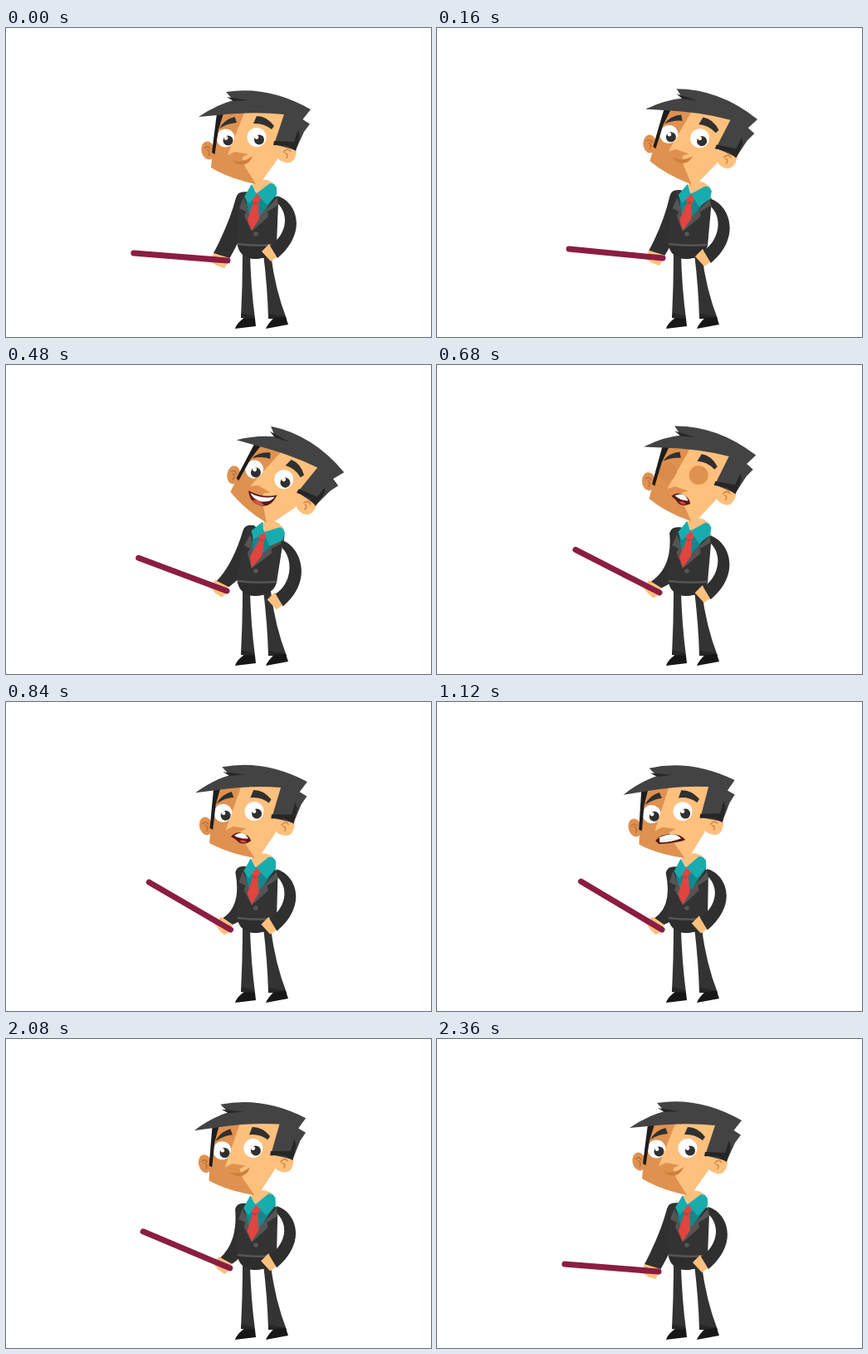
Write an HTML page that moves like this. It is 512 px wide and 372 px high and loops after 2880 ms.

```html
<!DOCTYPE html>
<html lang="en">
<head>
<meta charset="utf-8">
<title>Presenter</title>
<style>
  html, body { margin: 0; width: 100%; height: 100%; overflow: hidden; background: #fff; }
  svg { display: block; width: 100%; height: 100%; }
</style>
</head>
<body>
<svg viewBox="0 0 512 372">
  <g id="legs">
    <path fill="#333" d="M285 272H294Q295 312 300 350L283 349Q285 310 285 272Z"/>
    <path fill="#333" d="M310 272H319Q324 314 338 350L316 350Q315 312 310 272Z"/>
    <path fill="#262626" d="M284 343L299 347 300 351 283 349ZM317 344L336 347 338 351 316 350Z"/>
    <path fill="#171717" d="M276 362Q278 355 287 349L300 350 301 359ZM313 362Q316 355 323 349L337 348 340 357Z"/>
  </g>

  <path id="hand" fill="#fec07d"/>
  <path id="sleeve" fill="#303030"/>
  <path id="jacket" fill="#333"/>
  <path fill="#2d2d2d" d="M279 260Q300 263 325 261Q322 277 300 278Q281 277 279 260Z"/>
  <path fill="none" stroke="#565656" stroke-width="2.5" d="M279 260Q300 263 325 261"/>
  <g id="front">
    <path fill="#12888c" d="M288 202L326 200 315 215 296 244Z"/>
    <path fill="#555" d="M286 204L281 217 289 221 287 226 296 245 297 236 290 214Z"/>
    <path fill="#555" d="M327 204L328 213 315 221 316 227 296 245 306 226Z"/>
    <path fill="#e2443f" d="M302 198L309 204 304 210 305 230 296 244 291 231 298 210 295 205Z"/>
    <path fill="#c93a37" d="M298 209L304 210 300 213Z"/>
  </g>
  <circle cx="301" cy="248" r="2.8" fill="#565656"/>
  <path id="hip" fill="#fec07d" d="M308 269L317 260 329 274 319 281Z"/>
  <path id="arm" fill="#2f2f2f"/>

  <g id="top">
    <path fill="#fec07d" d="M299 182L315 183 323 187 303 200 297 190Z"/>
    <path fill="#18acae" d="M296 188L302 200 293 212 287 203Z"/>
    <path fill="#18acae" d="M318 187L323 188 326 192 326 201 314 213 302 199Z"/>

    <ellipse cx="243.5" cy="147.5" rx="8" ry="11" fill="#df9150" transform="rotate(-12 243.5 147.5)"/>
    <path fill="none" stroke="#b96f35" stroke-width="1.4" d="M239 145Q244 140 246 146M242 146Q247 149 244 154"/>
    <path fill="#df9150" d="M257 102H290L288 160 301 188Q268 181 247 168L250 138Z"/>
    <path fill="#fec07d" d="M287 102L338 100 326 140 327 158 307 186 301 188 288 167 284 154 267 153Z"/>
    <path fill="#df9150" d="M267 153L276 149 292 152 284 156Z"/>
    <path fill="#fec07d" d="M326 142Q348 137 350 149Q348 164 337 162Q329 160 326 155Z"/>
    <path fill="none" stroke="#d98643" stroke-width="1.6" d="M334 150Q339 143 343 149M336 151Q341 151 338 157"/>

    <g id="eyes">
      <circle cx="264.5" cy="132.5" r="11" fill="#fff"/>
      <circle cx="302" cy="131.5" r="11.5" fill="#fff"/>
      <circle cx="267.5" cy="135.5" r="6" fill="#303030"/>
      <circle cx="305" cy="134.5" r="6" fill="#303030"/>
      <circle cx="265" cy="132.5" r="2.4" fill="#fff"/>
      <circle cx="302" cy="131.5" r="2.4" fill="#fff"/>
    </g>
    <g id="lids">
      <circle cx="264.5" cy="132.5" r="11" fill="#d98b4a"/>
      <circle cx="302" cy="131.5" r="11.5" fill="#df9150"/>
    </g>
    <path fill="#fec07d" d="M281 118L286 118 276 149 269 149Z"/>
    <path fill="#303030" d="M257 121Q263 110 275.5 107L278 114Q267 114.5 257 121Z"/>
    <path fill="#303030" d="M298 115L302 106Q314 106 323 118L320 122Q310 114 298 115Z"/>

    <path id="smile" fill="#cf7f3c" d="M273 159.5Q286 163 297 154Q294 164 284 164.5Q276 164 273 159.5Z"/>
    <g id="grin">
      <path fill="#581a18" d="M267 159Q286 162 301 152Q300 170 285 171Q272 171 267 159Z"/>
      <path fill="#fff" d="M270 161Q286 163 299 155Q297 163 286 166Q276 167 270 161Z"/>
      <path fill="#d95743" d="M275 168Q283 164 291 169Q284 173 275 168Z"/>
    </g>
    <g id="oh">
      <path fill="#581a18" d="M273 161Q279 155 285 157Q295 159 297 167Q290 172 283 169Q279 164 273 161Z"/>
      <path fill="#fff" d="M277 160Q288 153 294 164Q285 165 277 160Z"/>
      <path fill="#d9443f" d="M283 167Q287 164 292 168Q288 171 283 167Z"/>
    </g>
    <g id="wide">
      <path fill="#581a18" d="M267 165Q271 159 281 158Q297 157 303 166Q294 169 271 169Z"/>
      <path fill="#fff" d="M272 161Q291 154 298 164Q286 168 272 167Z"/>
      <path stroke="#ddd" stroke-width=".8" d="M272 165L297 164"/>
    </g>

    <path fill="#1d1d1d" d="M254 103L262 103 256 122 251.5 152 248 150 251 126Z"/>
    <path fill="#434343" d="M232 107Q252 93 274 87L265 77Q316 69 367 98L357.5 110 366 115.5 359 125 349 147 323 140 335 104Q298 100 254 105Z"/>
    <path fill="#262626" d="M266 83L292 87 274 88Z"/>
    <path fill="#262626" d="M323 136L347 137 352 122 354 130 349 148 339 142 322 141Z"/>
  </g>
  <path id="stick" fill="none" stroke="#8b1d42" stroke-width="7" stroke-linecap="round"/>
</svg>
<script>
const LOOP = 2880, STEP = 40, ROD = 113.5;
const $ = id => document.getElementById(id);

// time, head tilt, stick angle, stick grip x/y, elbow x/y
const keys = [
  [0, 0, 4.5, 267, 280, 269, 235],
  [160, 9, 5.6, 272, 277, 273, 235],
  [480, 20.5, 20.5, 266, 272, 273, 240],
  [560, 21.3, 21.2, 266, 272, 274, 240],
  [680, 8.1, 27, 268, 274, 284, 243],
  [920, -3.7, 30.7, 271, 274, 284, 246],
  [1920, -3.7, 30.7, 271, 274, 284, 246],
  [2360, 0, 4.5, 267, 280, 269, 235],
  [LOOP, 0, 4.5, 267, 280, 269, 235]
];
const mouths = [
  [0, 'smile'], [280, 'grin'], [600, 'oh'], [760, 'wide'], [840, 'oh'],
  [1120, 'wide'], [1200, 'oh'], [1280, 'wide'], [1360, 'smile']
];

const rate = (i, c) => (keys[i + 1][c] - keys[i][c]) / (keys[i + 1][0] - keys[i][0]);
function slope(i, c) {
  if (i === 0 || i === keys.length - 1) return 0;
  const p = rate(i - 1, c), q = rate(i, c);
  return p * q <= 0 ? 0 : 2 * p * q / (p + q);
}

// Monotone cubic through the keys
function value(t, c) {
  let i = 0;
  while (i < keys.length - 2 && t >= keys[i + 1][0]) i++;
  const [a, b] = [keys[i], keys[i + 1]], h = b[0] - a[0], u = (t - a[0]) / h, v = 1 - u;
  return v * v * (1 + 2 * u) * a[c] + u * u * (3 - 2 * u) * b[c] +
    h * u * v * (v * slope(i, c) - u * slope(i + 1, c));
}

function turn(x, y, deg, cx = 0, cy = 0) {
  const r = deg * Math.PI / 180, c = Math.cos(r), s = Math.sin(r);
  return [cx + (x - cx) * c - (y - cy) * s, cy + (x - cx) * s + (y - cy) * c];
}
const shape = (id, d) => $(id).setAttribute('d', d);
const move = (id, m) => $(id).setAttribute('transform', m);
const show = (id, on) => $(id).setAttribute('visibility', on ? 'visible' : 'hidden');

function draw(t) {
  const [tilt, angle, hx, hy, ex, ey] = [1, 2, 3, 4, 5, 6].map(c => value(t, c));
  const [lx, ly] = turn(282, 198.5, tilt * .8, 301, 225);
  const [rx, ry] = turn(328, 204, tilt * .8, 301, 225);
  const sx = tilt * .33, sy = tilt * .66;

  move('top', `rotate(${tilt} 301 225)`);
  move('front', `translate(0 244) skewX(${-tilt * .6}) translate(0 -244)`);
  move('hip', `translate(${sx} ${sy})`);

  shape('jacket', `M${lx - 1} ${ly + 6}Q${lx} ${ly - 1} ${lx + 8} ${ly - 1}L${rx - 4} ${ry - 2}` +
    `Q${rx} ${ry} ${rx} ${ry + 6}L326 262Q322 277 300 278Q281 277 278 258Z`);
  shape('arm', `M${rx - 2} ${ry - 2}C${rx + 20} ${ry + 3} ${366 + sx} ${244 + sy} ${327 + sx} ${277 + sy}` +
    `L${318 + sx} ${262 + sy}C${337 + sx} ${250 + sy} ${rx + 14} ${ry + 22} ${rx} ${ry + 8}Z`);

  const bend = (angle - 4.5) / 26;
  shape('sleeve', `M${lx + 9} ${ly - 1}Q${lx - 3} ${ly - 3} ${lx - 5} ${ly + 6}` +
    `Q${ex} ${ey} ${hx - 17 + 8 * bend} ${hy - 9 - 5 * bend}` +
    `L${hx + 2.5} ${hy - 3 - 3 * bend}Q${ex + 18} ${ey + 12} ${lx + 9} ${ly + 25}Z`);

  const palm = [[-21, 1], [-17, -9], [0, -6], [0, 3], [-4, 9], [-13, 6]]
    .map(([x, y]) => turn(hx + x, hy + y, angle - 4.5, hx, hy));
  shape('hand', `M${palm.join('L')}Z`);
  const [tx, ty] = turn(hx - ROD, hy, angle, hx, hy);
  shape('stick', `M${tx} ${ty}L${hx} ${hy}`);

  const mouth = mouths.filter(m => m[0] <= t).pop()[1];
  for (const id of ['smile', 'grin', 'oh', 'wide']) show(id, id === mouth);
  const shut = t >= 640 && t < 760;
  show('eyes', !shut);
  show('lids', shut);
}

const start = performance.now();
function tick() {
  const t = (performance.now() - start) % LOOP;
  draw(Math.floor(t / STEP) * STEP);
  requestAnimationFrame(tick);
}
tick();
</script>
</body>
</html>
```
